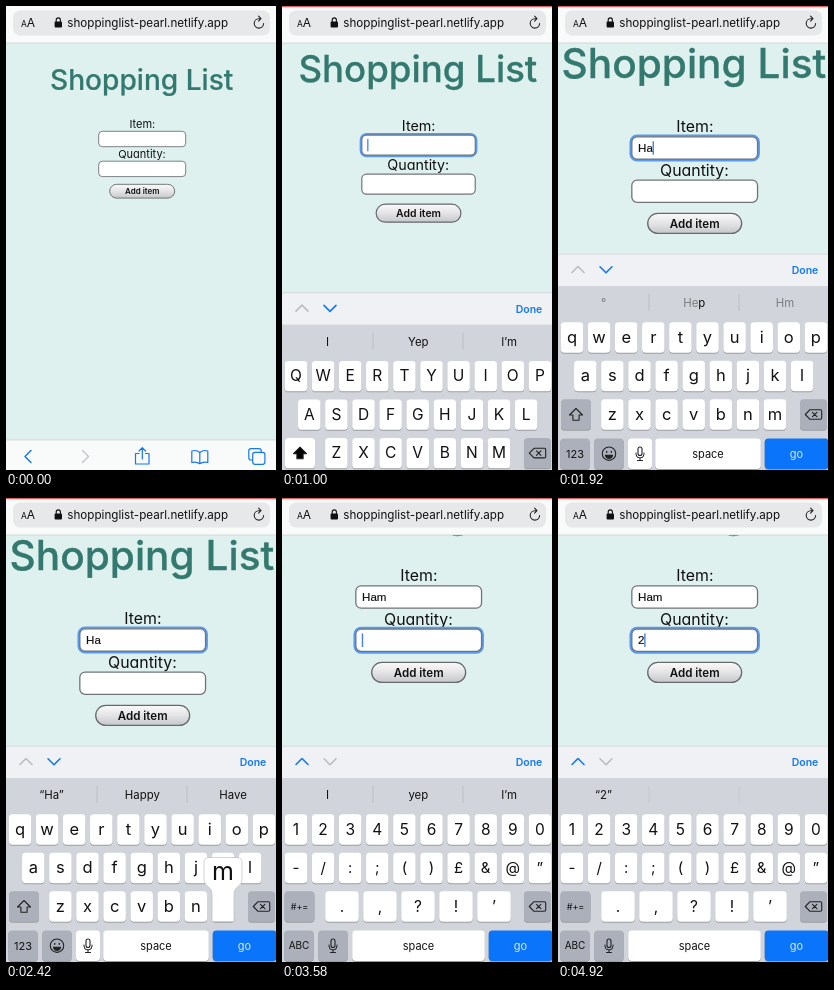
Write an HTML page that moves like this. It is 270 px wide and 464 px high and loops after 5.01 s.

```html
<!DOCTYPE html>
<html lang="en">
<head>
<meta charset="utf-8">
<title>Shopping list</title>
<style>
html, body { margin: 0; width: 100%; height: 100%; overflow: hidden; background: #def1ef; }
svg { display: block; width: 100vw; height: 100vh; }
text { font-family: Inter, Roboto, sans-serif; font-optical-sizing: none; text-anchor: middle; fill: #111; }
.round { font-feature-settings: "cv11"; stroke-linejoin: round; }
.title { fill: #34796f; stroke: #34796f; stroke-width: .2; }
.value { font-family: "Liberation Sans", Arial, sans-serif; font-size: 8px; text-anchor: start; stroke: #111; stroke-width: .12; }
.line { fill: none; stroke-linecap: round; stroke-linejoin: round; }
</style>
</head>
<body>
<svg id="stage" viewBox="0 0 270 464" preserveAspectRatio="none">
  <defs>
    <linearGradient id="shine" x2="0" y2="1">
      <stop offset="0" stop-color="#fafafa"/><stop offset=".5" stop-color="#e4e4e6"/><stop offset="1" stop-color="#c6c7ca"/>
    </linearGradient>
  </defs>
  <rect width="270" height="464" fill="#def1ef"/>
  <g id="page"></g>
  <g id="toolbar"></g>
  <g id="header"></g>
  <g id="keyboard">
    <rect y="248" width="270" height="240" fill="#d1d4da"/>
    <rect y="248" width="270" height="32" fill="#f0f1f4"/>
    <path d="M0 248.2H270" stroke="#c9cdd0" stroke-width=".6"/>
    <path id="up" class="line" d="M14 266.500l6-6 6 6" stroke-width="1.6"/>
    <path id="down" class="line" d="M42 260.800l6 6 6-6" stroke-width="1.6"/>
    <text x="247" y="268" font-size="10.5" font-weight="600" style="fill:#1478f0">Done</text>
    <path id="dividers" d="M91 288v17M181 288v17" stroke="#b7bbc2" stroke-width=".8"/>
    <g id="hints"></g>
    <g id="upper"></g>
    <g id="lower"></g>
    <g id="numeric"></g>
    <g id="pop"></g>
  </g>
  <rect id="edge" width="270" height="1.2" fill="#e2625f"/>
</svg>
<script>
const LOOP = 5010, BLUE = '#1478f0', GREY = '#b9bdc3', INK = '#222', DARK = '#abb0ba';
const $ = id => document.getElementById(id);
const clamp = v => Math.min(1, Math.max(0, v));
const span = (t, a, b) => clamp((t - a) / (b - a));
const smooth = p => p * p * (3 - 2 * p);
const show = (id, on) => $(id).setAttribute('visibility', on ? 'visible' : 'hidden');

const label = (s, x, y, size, extra = '') =>
  `<text x="${x}" y="${y}" font-size="${size}" ${extra}>${s}</text>`;
const line = (d, color, w = 1.2) =>
  `<path class="line" d="${d}" stroke="${color}" stroke-width="${w}"/>`;

// Web page
const field = (id, y) => `
  <rect id="${id}Ring" x="91.9" y="${y - .8}" width="88.6" height="17" rx="4.4" fill="none" stroke="#5a9aec" stroke-width="1.7"/>
  <rect x="92.7" y="${y}" width="87" height="15.4" rx="3.6" fill="#fff" stroke="#70747a" stroke-width=".9"/>
  <text id="${id}Text" class="value" x="97" y="${y + 10.5}"></text>
  <rect id="${id}Caret" y="${y + 3}" width="1" height="9.4" fill="#4a86e0"/>`;

$('page').innerHTML =
  label('Shopping List', 135.7, 84.4, 28.1, 'class="round title" font-weight="500"') +
  label('Item:', 136.3, 122.1, 11, 'class="round"') + field('item', 125.3) +
  label('Quantity:', 136, 152.1, 11, 'class="round"') + field('qty', 155.2) +
  '<rect x="103.7" y="178.3" width="65" height="13.8" rx="6.9" fill="url(#shine)" stroke="#66696d" stroke-width=".9"/>' +
  label('Add item', 136.2, 188.3, 8, 'class="round" font-weight="600"');

// Browser bars
$('header').innerHTML =
  '<rect width="270" height="37" fill="#f9fafa"/><path d="M0 37H270" stroke="#c5cdcd" stroke-width=".7"/>' +
  '<rect x="7" y="4.5" width="257" height="25" rx="7" fill="#e7e8ea"/>' +
  label('A', 18, 21, 8.5) + label('A', 25, 21, 12) +
  '<rect x="48.6" y="15.6" width="7.4" height="5.8" rx="1" fill="#111"/>' +
  line('M50.2 16v-2a2.1 2.1 0 0 1 4.2 0v2', '#111', 1.1) +
  label('shoppinglist-pearl.netlify.app', 141.7, 21, 11.65) +
  line('M257.6 17.6a4.7 4.7 0 1 1-4.7-4.9h1.6M252.6 10.2l2.4 2.5-2.4 2.4', INK, 1.1);

$('toolbar').innerHTML =
  '<rect y="434" width="270" height="30" fill="#f9fafa"/><path d="M0 434H270" stroke="#c5cdcd" stroke-width=".7"/>' +
  line('M25 444.5l-6 6 6 6', BLUE, 1.5) + line('M76.5 444.5l6 6-6 6', '#c6c9cd', 1.5) +
  line('M133 447.5h-3.5v10.5h13.5v-10.5h-3.5M136.3 453v-11M133 445l3.3-3.3 3.3 3.3', BLUE) +
  line('M193.8 446.5q-3.5-3-8-1.5v11.5q4.5-1.3 8 1.2q3.5-2.5 8-1.2v-11.5q-4.5-1.5-8 1.5v11', BLUE) +
  line('M246.5 454h-1.5q-2.2 0-2.2-2.2v-7q0-2.2 2.2-2.2h8q2.2 0 2.2 2.2v1.5', BLUE) +
  `<rect x="246.7" y="446.3" width="12.2" height="12" rx="2.2" fill="none" stroke="${BLUE}" stroke-width="1.2"/>`;

// Keyboards
const ROWS = [331.5, 370, 408.5, 447.7], PITCH = 27.1;
const key = (cx, row, w, fill = '#fff') => {
  const box = (y, color) =>
    `<rect x="${cx - w / 2}" y="${y}" width="${w}" height="30.4" rx="3.6" fill="${color}"/>`;
  return box(ROWS[row] - 14.2, '#9a9da3') + box(ROWS[row] - 15.2, fill);
};
const keyRow = (chars, row, x, pitch, w, size) => [...chars].map((c, i) =>
  key(x + i * pitch, row, w) + label(c, x + i * pitch, ROWS[row] + 5.4, size)).join('');

const mic = x =>
  `<rect x="${x - 2}" y="441" width="4" height="8.5" rx="2" fill="none" stroke="${INK}" stroke-width="1.1"/>` +
  line(`M${x - 4} 447v1a4 4 0 0 0 8 0v-1M${x} 452.2v2.3M${x - 2.5} 454.5h5`, INK, 1);
const space = (x, w) => key(x, 3, w) + label('space', x, 451.6, 11);
const erase = key(255.5, 2, 27, DARK) +
  line('M252 403.7h10.5q1.2 0 1.2 1.2v7.2q0 1.2-1.2 1.2H252l-4.7-4.8zM254.5 406.3l4.4 4.4M258.9 406.3l-4.4 4.4', INK, 1.1);
const go = key(238.7, 3, 64, '#0a74fa') + label('go', 238.5, 451.6, 11, 'style="fill:#d6e8ff"');

const letters = upper => {
  const fix = s => upper ? s.toUpperCase() : s, size = upper ? 15.5 : 16.5;
  return keyRow(fix('qwertyuiop'), 0, 14, PITCH, 22.5, size) +
    keyRow(fix('asdfghjkl'), 1, 27.3, PITCH, 22.5, size) +
    keyRow(fix('zxcvbnm'), 2, 54.4, PITCH, 22.5, size) +
    key(18, 2, 30, upper ? '#fff' : DARK) +
    `<path d="M18 402.5l-6.5 6.5h3.4v5.2h6.2v-5.2h3.4z" fill="${upper ? '#000' : 'none'}" stroke="${INK}" stroke-width="1.1" stroke-linejoin="round"/>` +
    erase + key(17, 3, 29.5, DARK) + label('123', 17, 451.6, 11) +
    key(51, 3, 29.5, DARK) +
    `<circle cx="51" cy="447.7" r="6.7" fill="none" stroke="${INK}" stroke-width="1.1"/>` +
    line('M48.7 445.3v1M53.3 445.3v1', INK, 1.3) +
    `<path d="M46.8 448.7h8.4a4.2 4.2 0 0 1-8.4 0z" fill="${INK}"/>` +
    key(82, 3, 24) + mic(82) + space(150, 105.5) + go;
};
$('upper').innerHTML = letters(true);
$('lower').innerHTML = letters(false);
$('numeric').innerHTML =
  keyRow('1234567890', 0, 14, PITCH, 22.5, 15.5) +
  keyRow('-/:;()£&@”', 1, 14, PITCH, 22.5, 15) +
  keyRow('.,?!’', 2, 60, 38, 33.5, 15.5) +
  key(17.5, 2, 30, DARK) + label('#+=', 17.5, 412, 9) + erase +
  key(17, 3, 29.5, DARK) + label('ABC', 17, 451.4, 10) +
  key(51, 3, 29.5, DARK) + mic(51) + space(136.5, 132.5) + go;

// Suggestion sets: start time and three words
const faint = (a, b = '') => `<tspan fill-opacity=".45">${a}</tspan>${b}`;
const HINTS = [
  [0, 'I', 'Yep', 'I’m'],
  [1540, '“H”', 'Hey', 'Hm'],
  [1890, faint('°'), faint('He', 'p'), faint('Hm')],
  [1990, '“Ha”', 'Happy', 'Have'],
  [2560, '“Ham”', 'Bremmo', 'Feldiron'],
  [3300, 'I', 'yep', 'I’m'],
  [4660, '“2”', '', '']
];
$('hints').innerHTML = HINTS.map(h =>
  '<g>' + h.slice(1).map((s, i) => label(s, 45.5 + i * 90.8, 301, 11.4)).join('') + '</g>').join('');
const hintSets = [...$('hints').children];

// Key presses: time, character, key centre, row
const PRESSES = [[1450, 'H', 162.8, 1], [1850, 'a', 27.3, 1], [2450, 'm', 217, 2], [4500, '2', 41.1, 0]];
const FOCUS = 1000, SWITCH = 3280;

const balloon = ([, c, x, row]) => {
  const y = ROWS[row];
  return `<path d="M${x - 11} ${y + 15}v-28q0-4-4-7t-4-7v-17q0-5 5-5h28q5 0 5 5v17q0 4-4 7t-4 7v28z" fill="#fff" stroke="#b4b7bd" stroke-width=".6"/>` +
    label(c, x, y - 27, 25);
};

function setField(id, value, active, caret) {
  const text = $(id + 'Text');
  if (text.textContent !== value) text.textContent = value;
  show(id + 'Ring', active);
  show(id + 'Caret', active && caret);
  if (active) $(id + 'Caret').setAttribute('x', 96.8 + (value ? text.getComputedTextLength() : 0));
}

let popped = null;
function render(t) {
  const zoom = smooth(span(t, 770, 1140));
  const scroll = 43 * smooth(span(t, 3130, 3460));
  const k = 1 + .445 * zoom;
  $('page').setAttribute('transform',
    `translate(${136 + .4 * zoom - 136 * k} ${-50.2 * zoom - scroll}) scale(${k})`);
  $('keyboard').setAttribute('transform', `translate(0 ${218 * (1 - span(t, 780, 1284)) ** 3})`);

  const onQty = t >= SWITCH;
  const typed = PRESSES.filter(p => t >= p[0]);
  const word = typed.slice(0, 3).map(p => p[1]).join('');
  const last = Math.max(onQty ? SWITCH : FOCUS, ...typed.map(p => p[0]));
  const caret = (t - last) % 1000 < 500;
  setField('item', word, t >= FOCUS - 180 && !onQty, caret);
  setField('qty', typed.length > 3 ? '2' : '', onQty, caret);

  show('upper', !onQty && !typed.length);
  show('lower', !onQty && typed.length > 0);
  show('numeric', onQty);
  $('up').setAttribute('stroke', onQty ? BLUE : GREY);
  $('down').setAttribute('stroke', onQty ? GREY : BLUE);
  $('dividers').setAttribute('opacity', 1 - .5 * span(t, 4660, 4840));

  hintSets.forEach((g, i) => {
    const end = i + 1 < HINTS.length ? HINTS[i + 1][0] : LOOP + 100;
    const rise = i ? span(t, HINTS[i][0] - 30, HINTS[i][0] + 30) : 1;
    g.setAttribute('opacity', rise * (1 - span(t, end - 30, end + 30)));
  });

  const press = PRESSES.find(p => t >= p[0] - 60 && t < p[0] + 50) || null;
  if (press !== popped) {
    $('pop').innerHTML = press ? balloon(press) : '';
    popped = press;
  }
  show('edge', t >= 80);
}

const start = performance.now();
function tick(now) {
  render(Math.max(0, now - start) % LOOP);
  requestAnimationFrame(tick);
}
render(0);
requestAnimationFrame(tick);
</script>
</body>
</html>
```
